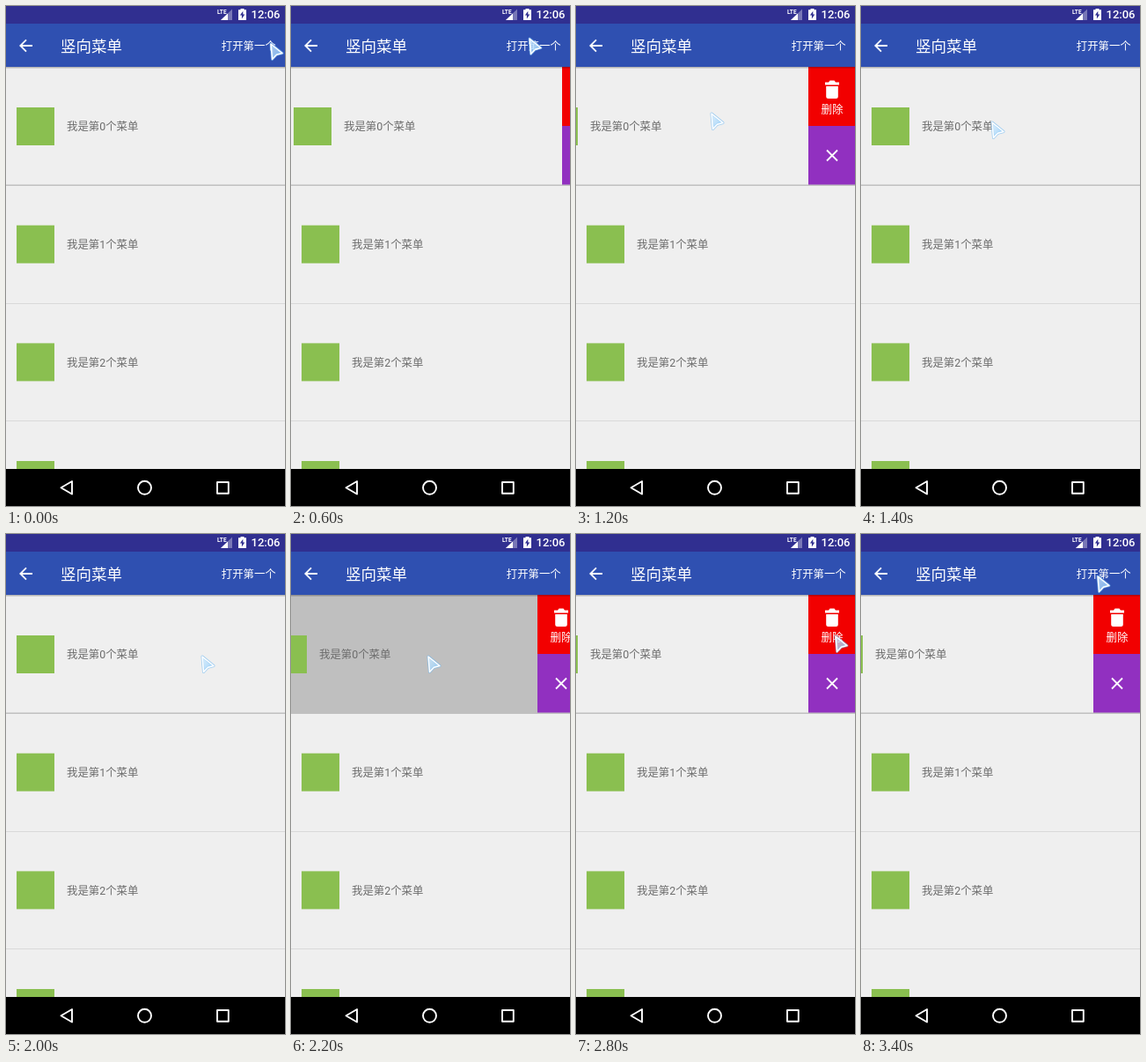
An HTML page that plays this animation: 317x567 px, repeating every 3.6 s.

```html
<!DOCTYPE html>
<html lang="zh-CN">
<head>
<meta charset="utf-8">
<title>竖向菜单</title>
<style>
html, body { margin: 0; width: 100%; height: 100%; overflow: hidden; background: #efefef; }
svg { display: block; width: 317px; height: 567px; }
text { font-family: Roboto, "Noto Sans CJK SC", "Noto Sans CJK", sans-serif; fill: #fff; }
.label { font-size: 12.4px; fill: #6c6c6c; }
.action { font-size: 12.4px; font-weight: 500; }
.line { fill: none; stroke: #fff; }
.icon { fill: #8abf50; }

#row, #press, #cursor { animation: 3.6s step-end infinite; }
#row { animation-name: slide; }
#press { animation-name: press; }
#cursor { animation-name: point; }

@keyframes slide {
  0% { transform: translateX(0); }
  16.665% { transform: translateX(-9px); }
  22.22% { transform: translateX(-53px); }
  38.885% { transform: translateX(0); }
  61.105% { transform: translateX(-37px); }
  66.66%, 100% { transform: translateX(-53px); }
}
@keyframes press {
  0% { fill: #efefef; }
  61.105% { fill: #bfbfbf; }
  66.66%, 100% { fill: #efefef; }
}
@keyframes point {
  0% { transform: translate(299px, 41px); }
  5.555% { transform: translate(273px, 33px); }
  11.11% { transform: translate(269px, 35px); }
  22.22% { transform: translate(268px, 47px); }
  27.775% { transform: translate(155px, 120px); }
  33.33% { transform: translate(152px, 120px); }
  38.885% { transform: translate(147px, 130px); }
  44.44% { transform: translate(136px, 135px); }
  49.995% { transform: translate(143px, 135px); }
  55.55% { transform: translate(221px, 137px); }
  61.105% { transform: translate(154px, 137px); }
  66.66% { transform: translate(114px, 140px); }
  72.215% { transform: translate(265px, 129px); }
  77.77% { transform: translate(293px, 114px); }
  83.325% { transform: translate(279px, 74px); }
  88.88% { transform: translate(266px, 45px); }
  94.435%, 100% { transform: translate(267px, 46px); }
}
</style>
</head>
<body>
<svg viewBox="0 0 317 567">
  <defs>
    <linearGradient id="shade" x2="0" y2="1">
      <stop stop-color="#000" stop-opacity=".3"/>
      <stop offset="1" stop-color="#000" stop-opacity="0"/>
    </linearGradient>
    <linearGradient id="glass" x2="1" y2="1">
      <stop stop-color="#d8efff" stop-opacity=".75"/>
      <stop offset="1" stop-color="#86c6f8" stop-opacity=".8"/>
    </linearGradient>
    <rect id="badge" class="icon" x="12" y="115" width="43" height="43"/>
  </defs>

  <rect width="317" height="567" fill="#efefef"/>

  <!-- list -->
  <g id="row">
    <rect id="press" y="69" width="317" height="134" fill="#efefef"/>
    <use href="#badge"/>
    <text class="label" x="69" y="141">我是第0个菜单</text>
    <rect x="317" y="69" width="54" height="67" fill="#f20000"/>
    <rect x="317" y="136" width="54" height="67" fill="#9130c0"/>
    <path fill="#fff" d="M336 86.5h4l1.500-2h5l1.500 2h4v3h-16zM337.200 91h13.600v11.500q0 2.500-2.500 2.500h-8.600q-2.500 0-2.500-2.500z"/>
    <text class="action" x="331.500" y="121.500">删除</text>
    <path class="line" stroke-width="1.800" d="M338 163.500l12 12m0-12l-12 12"/>
  </g>
  <use href="#badge" y="133.700"/>
  <text class="label" x="69" y="275">我是第1个菜单</text>
  <use href="#badge" y="267.400"/>
  <text class="label" x="69" y="409">我是第2个菜单</text>
  <use href="#badge" y="401"/>
  <rect y="202.500" width="317" height="1.500" fill="#c0c0c0"/>
  <path stroke="#d9d9d9" d="M0 337.500h317M0 470.500h317"/>

  <!-- app bar -->
  <rect y="69" width="317" height="2.500" fill="url(#shade)"/>
  <rect y="20" width="317" height="49" fill="#2f50b1"/>
  <rect width="317" height="20" fill="#302f90"/>
  <path class="line" stroke-width="1.800" d="M30 45H17M23 38.300L16.300 45l6.700 6.700"/>
  <text x="62" y="51.500" font-size="17.500">竖向菜单</text>
  <text class="action" x="244.800" y="49.500">打开第一个</text>

  <!-- status bar -->
  <path fill="#fff" fill-opacity=".35" d="M257 3.500v12.500h-13z"/>
  <path fill="#fff" d="M252 8.500v7.500h-8z"/>
  <text x="240" y="8.500" font-size="6.500" font-weight="700" textLength="auto">LTE</text>
  <path fill="#fff" d="M266.500 3h4v1.300h2.500v11.700h-9v-11.700h2.500z"/>
  <path fill="#302f90" d="M269.300 5.800v3.700h2l-3.400 5v-3.900h-2z"/>
  <text x="278.500" y="14.300" font-size="13" font-weight="500">12:06</text>

  <!-- navigation bar -->
  <rect y="525" width="317" height="42"/>
  <g class="line" stroke-width="1.900" stroke-linejoin="round">
    <path d="M75 539v14.500l-12.500-7.250z"/>
    <circle cx="157.500" cy="546.300" r="7.500"/>
    <rect x="240" y="540" width="12.800" height="12.800"/>
  </g>

  <g id="cursor" stroke-linejoin="round">
    <path fill="none" stroke="#69b4ee" stroke-opacity=".6" stroke-width="3" d="M2 2L15 12.500L8.500 14.300L3.500 19.500z"/>
    <path fill="url(#glass)" stroke="#fff" stroke-width="1.500" d="M2 2L15 12.500L8.500 14.300L3.500 19.500z"/>
  </g>
</svg>
</body>
</html>
```
